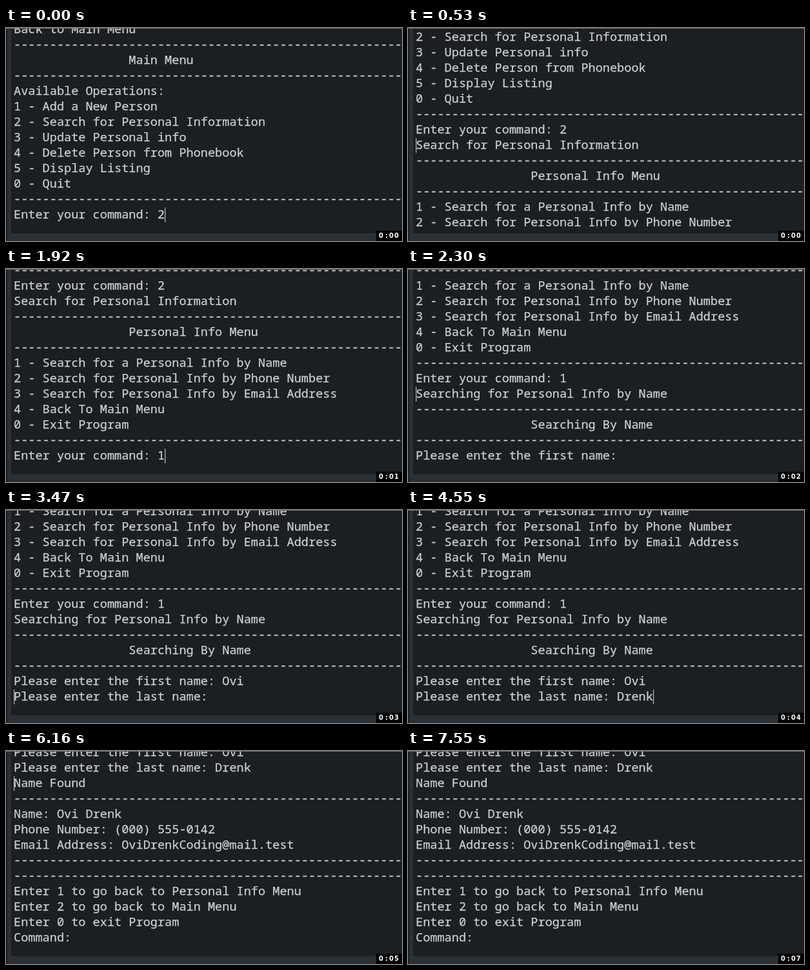
Recreate the animation shown at these times as an HTML page. Size 614 px wide and 331 px high, loop 8000 ms.

```html
<!DOCTYPE html>
<html lang="en">
<head>
<meta charset="utf-8">
<title>Phonebook console</title>
<style>
  html, body { margin: 0; width: 100%; height: 100%; overflow: hidden; background: #1b1f22; }
  svg { display: block; width: 614px; height: 331px; }
  #rows text {
    font: 18.58px "Noto Sans Mono", monospace; white-space: pre;
    fill: #cfd0d0; stroke: #cfd0d0; stroke-width: .25px;
  }
  #clock { font: bold 10px "DejaVu Sans", sans-serif; fill: #fff; }
</style>
</head>
<body>
<svg viewBox="0 0 614 331">
  <clipPath id="view"><rect y="1" width="614" height="308"/></clipPath>
  <rect width="614" height="331" fill="#1b1f22"/>
  <path d="M2 0H8V319H614V331H2Z" fill="#2b3034"/>
  <rect width="614" height="1" fill="#707274"/>
  <g clip-path="url(#view)">
    <g id="rows"></g>
    <rect id="caret" width="1.2" height="23" fill="#b8baba"/>
  </g>
  <rect x="574" y="315" width="40" height="16" fill="#000"/>
  <text id="clock" x="578 588 594 602" y="326"></text>
</svg>
<script>
const LOOP = 8000, TICK = 1030, BLINK = 525, SETTLE = 120;
const LEFT = 12, ADVANCE = 11.15, ROW = 24, BASELINE = 8, BOTTOM_ROW = 12, LONG_SCROLL = 6;
const rule = '-'.repeat(54);
const heading = title => [rule, ' '.repeat(16) + title, rule];

// Each step prints its output, then a prompt that is answered key by key.
const steps = [
  {
    output: [
      'Back to Main Menu',
      ...heading('Main Menu'),
      'Available Operations:',
      '1 - Add a New Person',
      '2 - Search for Personal Information',
      '3 - Update Personal info',
      '4 - Delete Person from Phonebook',
      '5 - Display Listing',
      '0 - Quit',
      rule
    ],
    prompt: 'Enter your command: ', answer: '2', firstKey: 0, enter: 530
  },
  {
    output: [
      'Search for Personal Information',
      ...heading('Personal Info Menu'),
      '1 - Search for a Personal Info by Name',
      '2 - Search for Personal Info by Phone Number',
      '3 - Search for Personal Info by Email Address',
      '4 - Back To Main Menu',
      '0 - Exit Program',
      rule
    ],
    prompt: 'Enter your command: ', answer: '1', firstKey: 1920, enter: 2300
  },
  {
    output: ['Searching for Personal Info by Name', ...heading('Searching By Name')],
    prompt: 'Please enter the first name: ', answer: 'Ovi', firstKey: 2980, keyGap: 120, enter: 3470
  },
  {
    output: [],
    prompt: 'Please enter the last name: ', answer: 'Drenk', firstKey: 3870, keyGap: 170, enter: 4800
  },
  {
    output: [
      'Name Found',
      rule,
      'Name: Ovi Drenk',
      'Phone Number: (000) 555-0142',
      'Email Address: OviDrenkCoding@mail.test',
      rule,
      rule,
      'Enter 1 to go back to Personal Info Menu',
      'Enter 2 to go back to Main Menu',
      'Enter 0 to exit Program'
    ],
    prompt: 'Command: ', answer: '', firstKey: LOOP, enter: LOOP
  }
];

const byId = id => document.getElementById(id);
const rows = byId('rows'), caret = byId('caret'), clock = byId('clock');

function addLine(content) {
  const text = document.createElementNS('http://www.w3.org/2000/svg', 'text');
  text.setAttribute('x', LEFT);
  text.textContent = content;
  rows.append(text);
}

for (const step of steps) {
  step.output.forEach(addLine);
  step.line = rows.children.length;
  addLine(step.prompt);
}

function typedCount({ answer, firstKey, keyGap = 1 }, ms) {
  return ms < firstKey ? 0 : Math.min(answer.length, 1 + Math.floor((ms - firstKey) / keyGap));
}

function draw(ms) {
  const index = steps.findIndex(step => ms < step.enter);
  const step = steps[index];
  const previous = steps[index - 1] || { line: step.line, enter: 0 };
  const typed = typedCount(step, ms);

  // A long scroll pauses halfway before it settles.
  const distance = step.line - previous.line;
  const settled = previous.enter + (distance > LONG_SCROLL ? SETTLE : 0);
  const top = step.line - BOTTOM_ROW - (ms < settled ? distance / 2 : 0);

  for (const s of steps) {
    rows.children[s.line].textContent = s.prompt + s.answer.slice(0, typedCount(s, ms));
  }
  [...rows.children].forEach((text, i) => {
    text.setAttribute('y', BASELINE + (i - top) * ROW);
    text.style.display = i > step.line ? 'none' : '';
  });

  const caretLine = typed ? step.line : previous.line + 1;
  const column = typed ? step.prompt.length + typed : 0;
  const idle = Math.max(0, ms - (typed ? step.firstKey + (typed - 1) * (step.keyGap || 1) : settled));
  caret.setAttribute('x', LEFT + column * ADVANCE);
  caret.setAttribute('y', (caretLine - top) * ROW - 9);
  caret.style.display = Math.floor(idle / BLINK) % 2 ? 'none' : '';

  clock.textContent = '0:0' + Math.floor(ms / TICK);
}

const start = performance.now();
function frame() {
  draw((performance.now() - start) % LOOP);
  requestAnimationFrame(frame);
}
frame();
</script>
</body>
</html>
```
